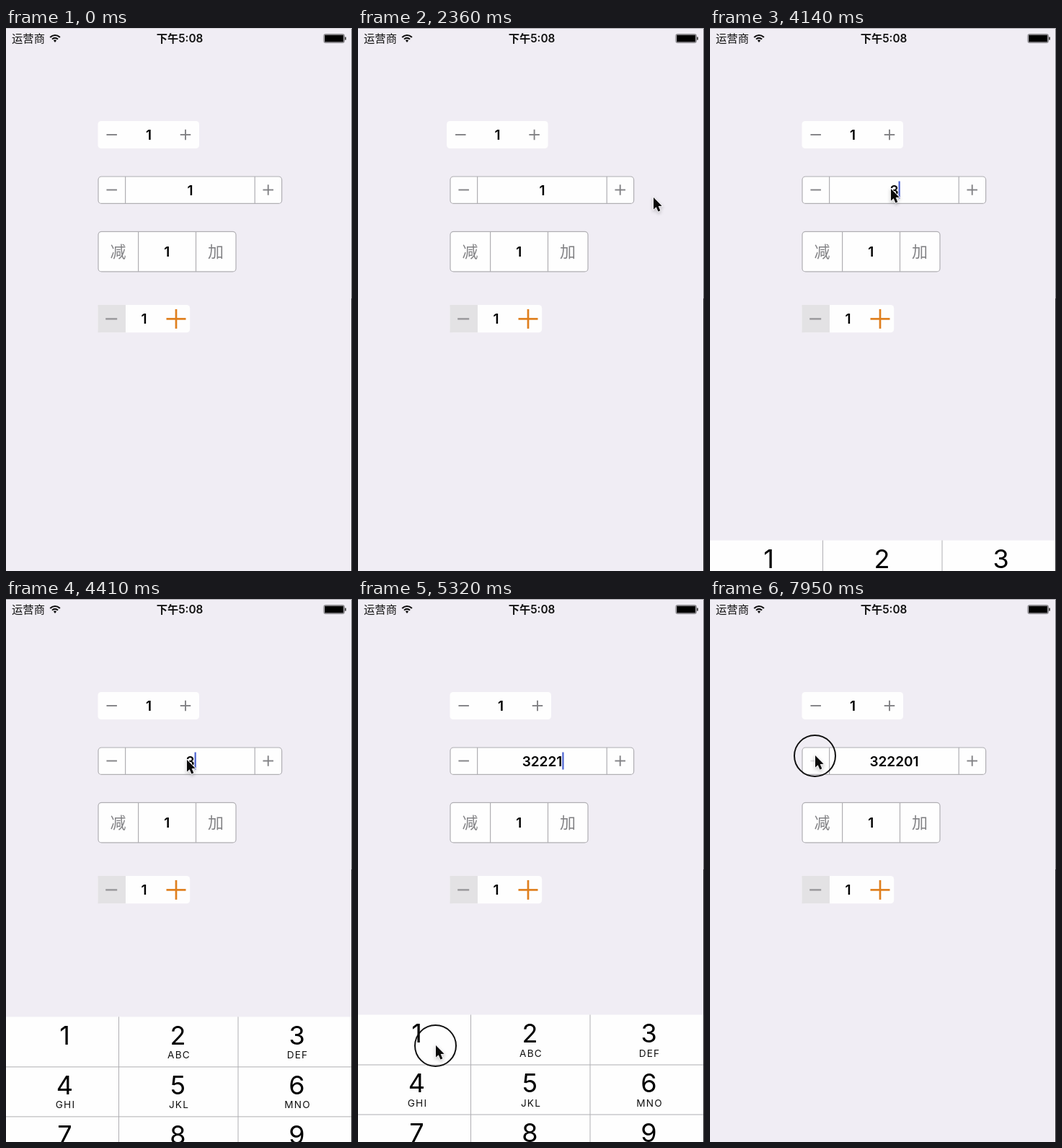
Animation, 480 px wide and 753 px high, one loop 8 s. Source, as an HTML page with a canvas:

```html
<!DOCTYPE html>
<html lang="zh-CN">
<head>
<meta charset="utf-8">
<title>Number steppers</title>
<style>
  html, body { margin: 0; width: 100%; height: 100%; overflow: hidden; background: #f0edf4; }
  canvas { display: block; width: 480px; height: 753px; }
</style>
</head>
<body>
<canvas id="stage"></canvas>
<script>
const W = 480, H = 753, LOOP = 8000;
const FONT = 'Inter, "Noto Sans CJK SC", "Noto Sans CJK", sans-serif';
const GRAY = '#828285', FAINT = '#dededf', LINE = '#b0afb3', WHITE = '#fefefe';
const HOLD = 85, REPEAT = 150, ROW = 69, SHAKE = 420;

const canvas = document.getElementById('stage');
const ctx = canvas.getContext('2d');
const dpr = window.devicePixelRatio || 1;
canvas.width = W * dpr;
canvas.height = H * dpr;

// The pointer's stops: position, time of the first tap, taps, time between taps
const stop = (name, x, y, at, taps = 0, gap = 230) => ({ name, x, y, at, taps, gap });
const stops = [
  stop('plusA', 251, 140, 790, 2),
  stop('minusA', 145, 146, 1504, 3),
  stop('rest', 409, 235, 2350),
  stop('plusB', 363, 221, 2780, 2),
  stop('field', 250, 223, 3945, 1),
  stop('key2', 213, 614, 4800, 3, 140),
  stop('key1', 107, 619, 5280, 2, 150),
  stop('rest', 392, 600, 5740),
  stop('away', 420, 204, 6060, 1),
  stop('minusB', 145, 217, 6590, 1)
];
const timeOf = name => stops.find(s => s.name === name).at;
const EDIT = timeOf('field') + 100, DONE = timeOf('away') + 30;
const taps = stops.flatMap(s =>
  Array.from({ length: s.taps }, (_, i) => ({ name: s.name, at: s.at + i * s.gap })));

const clamp = v => Math.max(0, Math.min(1, v));
const ease = v => v * v * (3 - 2 * v);
const settle = ms => ms <= 0 ? 0 : 1 - (1 + 0.018 * ms) * Math.exp(-0.018 * ms);

// Travel time grows with distance and ends just before the tap
function pointerAt(t) {
  let x = 281, y = 756, from = { x, y };
  for (const s of stops) {
    const time = 60 + 0.75 * Math.hypot(s.x - from.x, s.y - from.y);
    const k = ease(clamp(1 + (t - s.at + 15) / time));
    x += (s.x - x) * k;
    y += (s.y - y) * k;
    from = s;
  }
  const tap = taps.find(p => t >= p.at && (t < p.at + HOLD || p.name === 'minusB'));
  return { x, y, tap };
}

// Replays every tap so far
function stateAt(t) {
  let a = 1, b = 1, shake = 0;
  for (const { name, at } of taps) {
    const ms = t - at;
    if (ms < 0) break;
    if (name === 'plusA') a++;
    if (name === 'minusA') {
      if (a > 1) a--;
      else if (ms < SHAKE) shake = 12.8 * (1 - 2 * Math.abs(ms / 70 % 2 - 1));
    }
    if (name === 'plusB') b++;
    if (name.startsWith('key')) b = b * 10 + Number(name[3]);
    if (name === 'minusB') b -= 1 + Math.floor(ms / REPEAT);
  }
  return { a, b, shake };
}

function rect(x, y, w, h, color) {
  ctx.fillStyle = color;
  ctx.fillRect(x, y, w, h);
}

function panel(x, y, w, h, dividers) {
  ctx.beginPath();
  ctx.roundRect(x, y, w, h, 4.5);
  ctx.fillStyle = WHITE;
  ctx.fill();
  if (!dividers) return;
  ctx.strokeStyle = LINE;
  ctx.lineWidth = 1.2;
  ctx.stroke();
  for (const d of dividers) rect(d, y, 1.2, h, LINE);
}

function text(s, x, y, size, weight = 400, color = '#000', spacing = 0) {
  ctx.font = `${weight} ${size}px ${FONT}`;
  ctx.letterSpacing = spacing + 'px';
  ctx.fillStyle = color;
  ctx.fillText(s, x, y);
}

function minus(x, y, color, size = 14.5, thick = 1.9) {
  rect(x - size / 2, y - thick / 2, size, thick, color);
}

function plus(x, y, color, size = 14.5, thick = 1.9) {
  minus(x, y, color, size, thick);
  rect(x - thick / 2, y - size / 2, thick, size, color);
}

const digits = (v, x, y) => text(String(v), x, y, 19, 600);

function statusBar() {
  text('运营商', 31, 20, 15.3, 400, '#111');
  text('下午5:08', 241, 20, 15.3, 600, '#111');

  const a = -Math.PI * 0.76, b = -Math.PI * 0.24;
  ctx.strokeStyle = ctx.fillStyle = '#111';
  ctx.lineWidth = 2.1;
  for (const r of [5.4, 9.3]) {
    ctx.beginPath();
    ctx.arc(68, 19.3, r, a, b);
    ctx.stroke();
  }
  ctx.beginPath();
  ctx.moveTo(68, 20);
  ctx.arc(68, 19.3, 2.9, a, b);
  ctx.fill();

  ctx.beginPath();
  ctx.roundRect(440.8, 8.6, 28.6, 11.8, 2);
  ctx.strokeStyle = '#77767a';
  ctx.lineWidth = 1;
  ctx.stroke();
  rect(442, 9.6, 26.3, 9.8, '#000');
  rect(470.2, 12.5, 1.6, 4, '#333');
}

function steppers(t, p) {
  const { a, b, shake } = stateAt(t);
  const tint = name => p.tap && p.tap.name === name ? FAINT : GRAY;

  ctx.save();
  ctx.translate(shake, 0);
  panel(127.5, 129, 140.5, 38);
  minus(146.7, 148, tint('minusA'));
  plus(249, 148, tint('plusA'));
  digits(a, 198, 155);
  ctx.restore();

  panel(128, 206, 254.6, 37.4, [165, 344.6]);
  minus(146.7, 224.5, tint('minusB'));
  plus(363.7, 224.5, tint('plusB'));
  digits(b, 255.5, 231.6);
  if (t >= EDIT && t < DONE) {
    rect(255.5 + ctx.measureText(b).width / 2, 212.5, 2.2, 24, '#4b62d0');
  }

  panel(128, 282.3, 191, 55.6, [183, 262.9]);
  text('减', 155.5, 318, 22, 500, GRAY);
  text('加', 291, 318, 22, 500, GRAY);
  digits(1, 223.3, 317.3);

  panel(127.5, 384, 127.7, 38.3);
  rect(127.5, 384, 38.5, 38.3, '#e3e2e4');
  minus(146.2, 403.4, '#98979a', 16, 2.4);
  plus(236, 403.4, '#df7f1e', 27, 2.7);
  digits(1, 191.5, 410.4);
}

function keyboard(t, p) {
  const top = 853 - 276.5 * (settle(t - EDIT) - settle(t - DONE));
  if (top >= H) return;
  const letters = ['', 'ABC', 'DEF', 'GHI', 'JKL', 'MNO'];
  rect(0, top, 479, H - top, WHITE);
  for (let i = 0; i < 9; i++) {
    const c = i % 3, x = 81.5 + c * 161, y = top + Math.floor(i / 3) * ROW;
    if (p.tap && p.tap.name === 'key' + (i + 1) && t - p.tap.at < 35) {
      rect(c * 161, y, 157, ROW, '#d5d7dd');
    }
    text(String(i + 1), x - (c === 1 ? 4 : 0), y + 38.7, 36);
    if (letters[i]) text(letters[i], x + (c === 1 ? -2.5 : 1), y + 58, 13.6, 400, '#111', 1.2);
  }
  for (const x of [156, 321.5]) rect(x, top, 1, H - top, LINE);
  for (const n of [1, 2]) rect(0, top + n * ROW, 479, 1, LINE);
}

function pointer({ x, y, tap }) {
  ctx.save();
  ctx.translate(x + 0.5, y + 0.5);
  if (tap) {
    ctx.beginPath();
    ctx.arc(0, 0, 28.5, 0, 2 * Math.PI);
    ctx.strokeStyle = '#111';
    ctx.lineWidth = 2;
    ctx.stroke();
  }
  ctx.translate(0.5, 0);
  ctx.scale(0.95, 0.95);
  ctx.beginPath();
  ctx.moveTo(0, -0.5);
  ctx.lineTo(0, 16.8);
  ctx.lineTo(3.9, 13.3);
  ctx.lineTo(6.8, 20);
  ctx.lineTo(9.8, 18.7);
  ctx.lineTo(7, 12.2);
  ctx.lineTo(12.2, 11.8);
  ctx.closePath();
  ctx.shadowColor = 'rgba(0,0,0,.25)';
  ctx.shadowBlur = 4 * dpr;
  ctx.shadowOffsetY = 2 * dpr;
  ctx.strokeStyle = '#f6f5f8';
  ctx.lineWidth = 2;
  ctx.stroke();
  ctx.shadowColor = 'transparent';
  ctx.fillStyle = '#0a0a0a';
  ctx.fill();
  ctx.restore();
}

function draw(t) {
  const p = pointerAt(t);
  ctx.setTransform(dpr, 0, 0, dpr, 0, 0);
  ctx.textAlign = 'center';
  ctx.textBaseline = 'alphabetic';
  rect(0, 0, W, H, '#f0edf4');
  rect(0, 0, W, 1, t < 860 ? '#d3d2d7' : '#a9a8ad');
  statusBar();
  steppers(t, p);
  keyboard(t, p);
  rect(479, 1, 1, 374, '#77767a');
  rect(479, 375, 1, H - 375, '#2c2c2f');
  pointer(p);
}

function tick() {
  draw(performance.now() % LOOP);
  requestAnimationFrame(tick);
}
tick();
</script>
</body>
</html>
```
